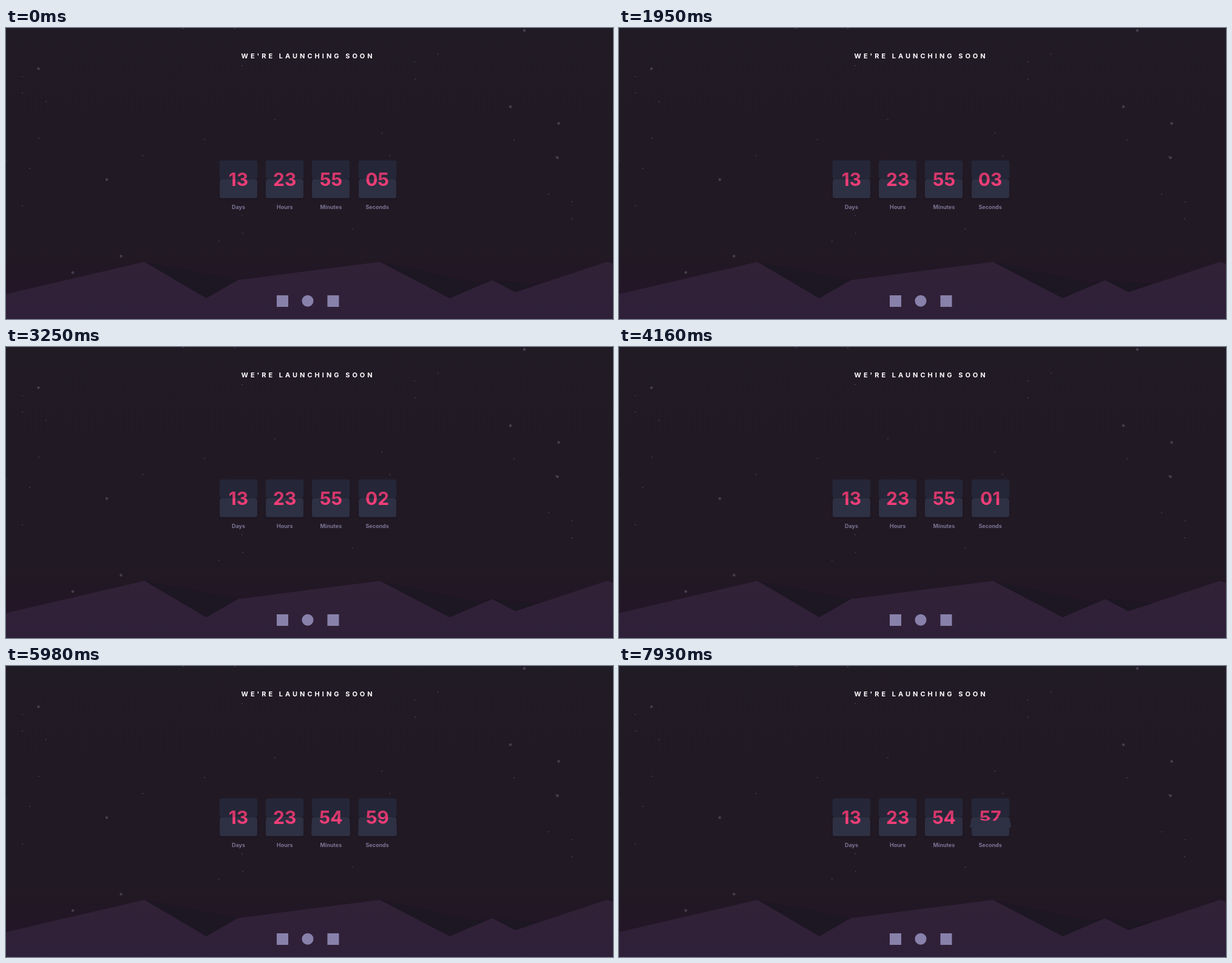
An HTML page for the animation above (8 s loop, 1000 px wide and 479 px high).

```html
<!DOCTYPE html>
<html lang="en">
<head>
<meta charset="utf-8">
<title>Countdown</title>
<style>
html, body { margin: 0; width: 100%; height: 100%; overflow: hidden; background: #211a25; }
body { position: relative; font: 700 9px Inter, "Open Sans", sans-serif; }
svg { position: absolute; left: 0; top: 0; }
h1 { position: absolute; left: 387.5px; top: 36px; margin: 0; font: inherit; font-size: 11px;
  line-height: 20px; letter-spacing: 4px; white-space: nowrap; color: #fff; }
.card { position: absolute; top: 218px; width: 62px; height: 62px; }
.label { position: absolute; top: 71px; left: 50%; transform: translateX(-50%);
  line-height: 12px; color: #7b7493; }
.half { position: absolute; left: 0; width: 62px; height: 31px; overflow: hidden;
  font-size: 30px; line-height: 62px; text-align: center; }
.half span { display: block; }
.top { top: 0; background: #252738; color: #d3376a; border-radius: 3px 3px 4px 4px; transform-origin: 50% 100%; }
.bottom { top: 31px; background: #2e3043; color: #f23e78; border-radius: 4px 4px 3px 3px;
  transform-origin: 50% 0; box-shadow: 0 2px 3px #1a141f99; }
.bottom span { margin-top: -31px; }
.flap { box-shadow: none; }
</style>
</head>
<body>
<svg width="1000" height="479" viewBox="0 0 1000 479">
  <defs>
    <linearGradient id="sky" x2="0" y2="1">
      <stop offset="0" stop-color="#211b26"/>
      <stop offset=".78" stop-color="#211924"/>
      <stop offset=".88" stop-color="#231626"/>
    </linearGradient>
    <linearGradient id="hill" x2="0" y2="1">
      <stop offset="0" stop-color="#312237"/>
      <stop offset="1" stop-color="#2f2039"/>
    </linearGradient>
  </defs>
  <rect width="1000" height="479" fill="url(#sky)"/>
  <g id="stars"></g>
  <path fill="#1d1623" d="M228 385L384 415L330 446ZM616 385L775 419L801 415L880 421L839 436L731 446Z"/>
  <path fill="url(#hill)" d="M0 438L228 385L330 445L382 415L616 385L731 445L801 415L839 435L990 385L1000 388V479H0Z"/>
  <g fill="#8881aa">
    <rect x="446" y="440" width="19" height="19"/>
    <circle cx="497" cy="449.3" r="9.5"/>
    <rect x="529.5" y="440" width="19" height="19"/>
  </g>
</svg>
<h1>WE'RE LAUNCHING SOON</h1>
<script>
const LOOP = 8000, FIRST = 273, TICK = 1040, FLIP = 624;
const START = ((13 * 24 + 23) * 60 + 55) * 60 + 5;

const bigStars = [292,-1, 854,4, 53.5,67, 831,129.5, 910.5,157, 166,249.5, 908.5,213.5, 189.5,375.5, 110,402.5];
const smallStars = [377,1, 27,80, 27,107, 66,121, 389,62, 673,56, 674,84, 712,43, 443,151, 327,183.5,
  619.5,173, 837,184, 632,210, 54,181.5, 39,231, 225.5,210, 0,218, 906,212, 894,273, 933,286,
  932,314, 27,292.5, 389,309, 390,338, 351,351, 570.5,331];

function drawStars(points, r, fill) {
  let dots = '';
  for (let i = 0; i < points.length; i += 2)
    dots += `<circle cx="${points[i]}" cy="${points[i + 1]}" r="${r}" fill="${fill}"/>`;
  document.getElementById('stars').innerHTML += dots;
}
drawStars(bigStars, 2.3, '#463e4d');
drawStars(smallStars, 1.1, '#433b4a');

function addHalf(card, kind) {
  const half = document.createElement('div');
  half.className = 'half ' + kind;
  const text = half.appendChild(document.createElement('span'));
  card.append(half);
  return { style: half.style, set: value => { if (text.textContent !== value) text.textContent = value; } };
}

const cards = ['Days', 'Hours', 'Minutes', 'Seconds'].map((name, i) => {
  const card = document.createElement('div');
  card.className = 'card';
  card.style.left = 352 + 76.2 * i + 'px';
  card.innerHTML = `<div class="label">${name}</div>`;
  document.body.append(card);
  const [top, bottom, fall, land] =
    ['top', 'bottom', 'top flap', 'bottom flap'].map(kind => addHalf(card, kind));
  return { top, bottom, fall, land };
});

const split = s => [s / 86400, s / 3600 % 24, s / 60 % 60, s % 60]
  .map(v => String(Math.floor(v)).padStart(2, '0'));

function turn(flap, shown, angle) {
  flap.style.visibility = shown ? 'visible' : 'hidden';
  flap.style.transform = `perspective(270px) rotateX(${angle}deg)`;
}

function render(now) {
  const t = now % LOOP;
  const ticks = Math.floor((t - FIRST) / TICK) + 1;
  const u = ticks ? Math.min(1, (t - FIRST - (ticks - 1) * TICK) / FLIP) : 1;
  const next = split(START - ticks), prev = split(START - ticks + 1);
  // The old top falls with ease-in, then the new bottom lands with ease-out.
  const angle = 90 * Math.pow(1 - Math.abs(2 * u - 1), 1.7);

  cards.forEach((card, i) => {
    const flipping = u < 1 && next[i] !== prev[i];
    card.top.set(next[i]);
    card.bottom.set(flipping ? prev[i] : next[i]);
    card.fall.set(prev[i]);
    card.land.set(next[i]);
    turn(card.fall, flipping && u < .5, -angle);
    turn(card.land, flipping && u >= .5, angle);
  });
}

let begin;
function frame(now) {
  begin ??= now;
  render(now - begin);
  requestAnimationFrame(frame);
}
render(0);
requestAnimationFrame(frame);
</script>
</body>
</html>
```
